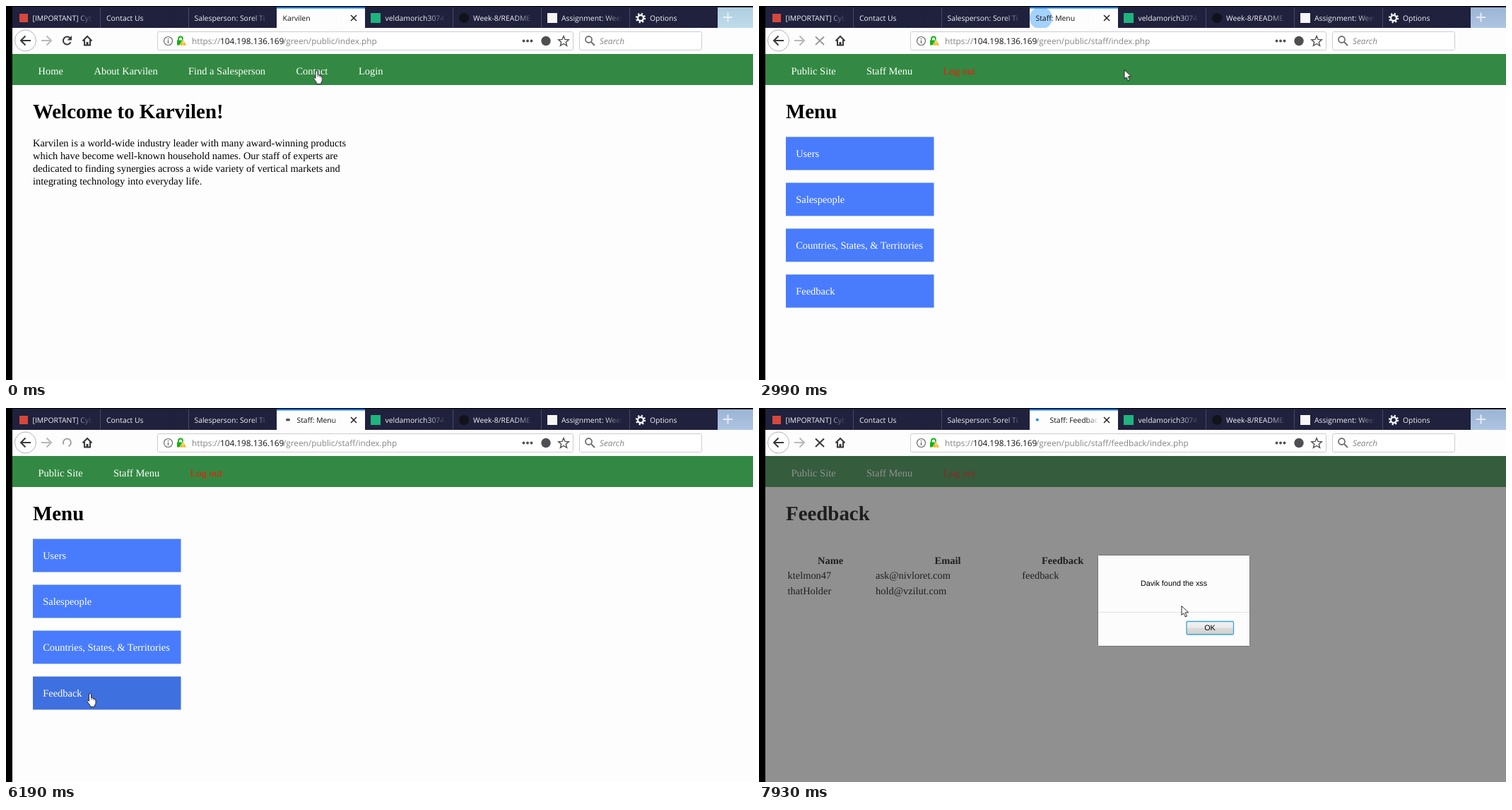
An HTML page for the animation above (8 s loop, 1057 px wide and 530 px high).

```html
<!DOCTYPE html>
<html lang="en">
<head>
<meta charset="utf-8">
<title>Browser session</title>
<style>
html, body { margin: 0; width: 100%; height: 100%; overflow: hidden; background: #fdfdfd; }
svg { display: block; }
text { white-space: pre; text-rendering: geometricPrecision; }

.tabs text { font: 10.4px "Open Sans", sans-serif; fill: #f4f4f6; }
.tabs .active text { fill: #111; }
.bar text { font: 11.8px "Open Sans", sans-serif; fill: #858588; }
.bar .host { fill: #111; }
.bar .hint { font-style: italic; }
.page text { font: 14.45px "Liberation Serif", serif; }
.page .h1 { font-size: 28.9px; font-weight: bold; }
.page .th { font-weight: bold; }
.page .light text, .page text.light { fill: #fff; }
.page text.out { fill: #ff1208; }
.dialog text { font: 10.8px "Liberation Sans", sans-serif; text-anchor: middle; }
.line { fill: none; stroke: #39393d; stroke-width: 2; }

/* Every change is a hard cut on one 8 s clock */
.home, .menu, .feedback, .title, .busy, .burst, .reload, .arc, .cross, .slash,
.hover, .cursor, .hand, .arrow, .corner { animation: 8s step-end infinite; }

.home { animation-name: home; }
.menu { animation-name: menu; }
.feedback { animation-name: feedback; }
.title { animation-name: title; }
.busy { animation-name: busy; }
.burst { animation-name: burst; }
.reload { animation-name: reload; }
.arc { animation-name: arc; }
.cross { animation-name: cross; }
.slash { animation-name: slash; }
.hover { animation-name: hover; }
.cursor { animation-name: move; }
.hand { animation-name: hand; }
.arrow { animation-name: arrow; }
.corner { animation-name: corner; }

@keyframes home { 0% { opacity: 1 } 35.875%, 100% { opacity: 0 } }
@keyframes menu { 0% { opacity: 0 } 35.875% { opacity: 1 } 79.25%, 100% { opacity: 0 } }
@keyframes feedback { 0% { opacity: 0 } 79.25%, 100% { opacity: 1 } }
@keyframes corner { 0% { opacity: 0 } 34.125%, 100% { opacity: 1 } }
@keyframes title {
  0% { transform: translateX(0) } 34.125% { transform: translateX(20px) }
  37.375% { transform: translateX(0) } 75.875%, 100% { transform: translateX(20px) }
}
@keyframes busy {
  0% { opacity: 0; fill: #555; rx: 2px; transform: translateX(403px) }
  34.125% { opacity: 1; fill: #555; rx: 2px; transform: translateX(402px) }
  35.875% { opacity: 1; fill: #0a84ff; rx: 3px; transform: translateX(398px) }
  37.375% { opacity: 0; fill: #555; rx: 2px; transform: translateX(403px) }
  75.875% { opacity: 1; fill: #555; rx: 2.2px; transform: translateX(403px) }
  77.375% { opacity: 1; fill: #555; rx: 3px; transform: translateX(399px) }
  79.25% { opacity: 1; fill: #0a84ff; rx: 2.2px; transform: translateX(403px) }
  80.875% { opacity: 1; fill: #0a84ff; rx: 2.5px; transform: translateX(402px) }
  82.625% { opacity: 1; fill: #0a84ff; rx: 3px; transform: translateX(398.7px) }
  84.25% { opacity: 1; fill: #0a84ff; rx: 2.5px; transform: translateX(395.4px) }
  85.75% { opacity: 1; fill: #0a84ff; rx: 2px; transform: translateX(393.8px) }
  87.25% { opacity: 1; fill: #0a84ff; rx: 2.2px; transform: translateX(394.6px) }
  89% { opacity: 1; fill: #0a84ff; rx: 3px; transform: translateX(397.9px) }
  90.5% { opacity: 1; fill: #0a84ff; rx: 2.5px; transform: translateX(401.1px) }
  92.375% { opacity: 1; fill: #0a84ff; rx: 2px; transform: translateX(403.2px) }
  94.25% { opacity: 1; fill: #0a84ff; rx: 2.5px; transform: translateX(401.7px) }
  95.75% { opacity: 1; fill: #0a84ff; rx: 3px; transform: translateX(398.7px) }
  97.25% { opacity: 1; fill: #0a84ff; rx: 2.5px; transform: translateX(395.6px) }
  99.125%, 100% { opacity: 1; fill: #0a84ff; rx: 2px; transform: translateX(393.8px) }
}
@keyframes burst {
  0% { opacity: 0; r: 16px } 37.375% { opacity: .36; r: 16px }
  39.375% { opacity: .1; r: 88px } 41.125%, 100% { opacity: 0; r: 88px }
}
@keyframes reload {
  0% { opacity: 1 } 35.875% { opacity: 0 } 44.25% { opacity: .5 } 45.75% { opacity: 1 }
  75.875% { opacity: .6 } 77.375%, 100% { opacity: 0 }
}
@keyframes arc {
  0% { opacity: 0 } 41.125% { opacity: .45 } 44.25% { opacity: 0 }
  77.375% { opacity: .45 } 79.25%, 100% { opacity: 0 }
}
@keyframes cross {
  0% { opacity: 0 } 35.875% { opacity: 1 } 37.375% { opacity: .5 }
  41.125% { opacity: 0 } 79.25%, 100% { opacity: 1 }
}
@keyframes slash {
  0% { stroke-dasharray: 20 20 } 79.25% { stroke-dasharray: 6 20 } 80.875%, 100% { stroke-dasharray: 20 20 }
}
@keyframes hover { 0% { fill: #497cfd } 55.75%, 100% { fill: #3f70e0 } }
@keyframes hand {
  0% { opacity: 1 } 35.875% { opacity: 0 } 55.75% { opacity: 1 } 79.25%, 100% { opacity: 0 }
}
@keyframes arrow {
  0% { opacity: 0 } 35.875% { opacity: 1 } 55.75% { opacity: 0 } 79.25%, 100% { opacity: 1 }
}
@keyframes move {
  0% { transform: translate(434.5px, 91px) }
  1.5% { transform: translate(426px, 92px) }
  3% { transform: translate(418px, 93px) }
  19.375% { transform: translate(419px, 90px) }
  21.25% { transform: translate(422px, 86px) }
  23.125% { transform: translate(431px, 86px) }
  24.625% { transform: translate(452px, 87px) }
  26.25% { transform: translate(477px, 89px) }
  27.75% { transform: translate(499px, 91px) }
  29.25% { transform: translate(510px, 91px) }
  31% { transform: translate(511.5px, 90px) }
  35.875% { transform: translate(516.5px, 90px) }
  41.125% { transform: translate(503px, 122px) }
  42.625% { transform: translate(446px, 215px) }
  44.25% { transform: translate(370px, 305px) }
  45.75% { transform: translate(324px, 334px) }
  47.5% { transform: translate(318px, 346px) }
  49.125% { transform: translate(311px, 359px) }
  50.875% { transform: translate(298px, 373px) }
  52.375% { transform: translate(287px, 382px) }
  54.25% { transform: translate(262px, 388px) }
  55.75% { transform: translate(206px, 397px) }
  57.25% { transform: translate(150px, 405px) }
  58.75% { transform: translate(119px, 406px) }
  60.625% { transform: translate(127px, 408px) }
  62.25% { transform: translate(135px, 408px) }
  64% { transform: translate(112px, 406px) }
  65.5% { transform: translate(100px, 404px) }
  67.125% { transform: translate(114px, 404px) }
  79.25% { transform: translate(118.5px, 403.5px) }
  82.625% { transform: translate(145px, 426px) }
  84.25% { transform: translate(290px, 470px) }
  85.75% { transform: translate(500px, 458px) }
  87.25% { transform: translate(655px, 391px) }
  89% { transform: translate(640px, 285px) }
  90.5% { transform: translate(608px, 210px) }
  92.375% { transform: translate(605px, 209px) }
  94.25% { transform: translate(601px, 232px) }
  95.75% { transform: translate(600px, 262px) }
  97.25% { transform: translate(598px, 277px) }
  99.125%, 100% { transform: translate(597.5px, 280px) }
}
</style>
</head>
<body>
<svg width="1057" height="530" viewBox="0 0 1057 530">
  <defs>
    <linearGradient id="fadeDark"><stop stop-color="#20213d" stop-opacity="0"/><stop offset="1" stop-color="#20213d"/></linearGradient>
    <linearGradient id="fadeLight"><stop stop-color="#fdfdfd" stop-opacity="0"/><stop offset="1" stop-color="#fdfdfd"/></linearGradient>
    <linearGradient id="sky" x2="0" y2="1"><stop stop-color="#aecfe1"/><stop offset="1" stop-color="#bfdbe8"/></linearGradient>
    <linearGradient id="dusk" x2="0" y2="1"><stop stop-color="#9db5d4"/><stop offset="1" stop-color="#adc5e2"/></linearGradient>
    <linearGradient id="button" x2="0" y2="1">
      <stop stop-color="#f3f3f3"/><stop offset=".48" stop-color="#e9e9e9"/>
      <stop offset=".5" stop-color="#dcdcdc"/><stop offset="1" stop-color="#cfcfcf"/>
    </linearGradient>
    <clipPath id="tab"><path d="M383 3h125v28H383z"/></clipPath>
    <g id="end">
      <path d="M-36 3h26v27h-26z" fill="url(#fadeDark)"/>
      <path d="M-10.500 3H0v27h-10.500z" fill="#20213d"/>
      <path d="M.5 2v29" stroke="#484963"/>
    </g>
  </defs>

  <rect width="1057" height="530" fill="#fdfdfd"/>

  <g class="page">
    <path d="M9 68h1048v44H9z" fill="#338943"/>

    <g class="home">
      <g class="light">
        <text x="45.6" y="97">Home</text>
        <text x="124.5" y="97">About Karvilen</text>
        <text x="258" y="97">Find a Salesperson</text>
        <text x="410.4" y="97">Contact</text>
        <text x="499" y="97">Login</text>
      </g>
      <text class="h1" x="38" y="159">Welcome to Karvilen!</text>
      <text x="38" y="199">Karvilen is a world-wide industry leader with many award-winning products</text>
      <text x="38" y="217">which have become well-known household names. Our staff of experts are</text>
      <text x="38" y="235">dedicated to finding synergies across a wide variety of vertical markets and</text>
      <text x="38" y="253">integrating technology into everyday life.</text>
    </g>

    <g class="menu">
      <text class="light" x="45.6" y="97">Public Site</text>
      <text class="light" x="152" y="97">Staff Menu</text>
      <text class="out" x="260.6" y="97">Log out</text>
      <text class="h1" x="38" y="159">Menu</text>
      <path d="M38 185.500h209.500v47H38zM38 250.500h209.500v47H38zM38 315.500h209.500v47H38z" fill="#497cfd"/>
      <path class="hover" d="M38 380.500h209.500v47H38z"/>
      <g class="light">
        <text x="52.2" y="214">Users</text>
        <text x="52.2" y="279">Salespeople</text>
        <text x="52.2" y="344">Countries, States, &amp; Territories</text>
        <text x="52.2" y="409">Feedback</text>
      </g>
    </g>

    <g class="feedback">
      <text class="light" x="45.6" y="97">Public Site</text>
      <text class="light" x="152" y="97">Staff Menu</text>
      <text class="out" x="260.6" y="97">Log out</text>
      <text class="h1" x="38" y="159">Feedback</text>
      <text class="th" x="83" y="220.5">Name</text>
      <text class="th" x="248.5" y="220.5">Email</text>
      <text class="th" x="400" y="220.5">Feedback</text>
      <text x="40.5" y="242">ktelmon47</text>
      <text x="165" y="242">ask@nivloret.com</text>
      <text x="372.3" y="242">feedback</text>
      <text x="40.5" y="263.5">thatHolder</text>
      <text x="165" y="263.5">hold@vzilut.com</text>
      <path d="M9 68h1048v462H9z" fill="#37373a" fill-opacity=".55"/>
    </g>
  </g>

  <g class="feedback dialog">
    <rect x="479.5" y="208.5" width="215" height="129" rx="1" fill="#fcfcfc" stroke="#747577"/>
    <path d="M480 289.500h214" stroke="#e4e4e4"/>
    <text x="587" y="252">Davik found the xss</text>
    <rect x="605" y="302.5" width="66.5" height="18.5" rx="1.5" fill="url(#button)" stroke="#3ba6cf" stroke-width="1.3"/>
    <text x="638" y="315.3">OK</text>
  </g>

  <g class="bar">
    <path d="M9 31h1048v37H9z" fill="#fdfdfd"/>
    <circle cx="27.5" cy="49" r="15" fill="#fff" stroke="#b4b4b7"/>
    <path class="line" d="M35 49H21m6.500-6.500L21 49l6.500 6.500"/>
    <path class="line" d="M50 49h14m-6.500-6.500L64 49l-6.500 6.500" stroke-opacity=".35"/>
    <g class="reload">
      <path class="line" d="M91 46a5.500 5.500 0 1 0 .5 5.200"/>
      <path d="M93 42v6.500h-6.500z" fill="#39393d"/>
    </g>
    <path class="arc line" d="M81.500 51.500a5.500 5.500 0 1 1 7 2.600"/>
    <g class="cross line">
      <path d="M80 43.500L92 55"/>
      <path class="slash" d="M80 55L92 43.500"/>
    </g>
    <path class="line" d="M108.500 49.500l6.500-6.500 6.500 6.500M111 48v7.500h8V48"/>
    <path d="M113.500 51h3v5h-3z" fill="#39393d"/>

    <rect x="214.5" y="36.5" width="588" height="26" rx="2" fill="#fff" stroke="#cdcdd0"/>
    <circle cx="229.5" cy="49.5" r="6" fill="none" stroke="#6b6b6f" stroke-width="1.2"/>
    <path d="M229.500 48.500v4.500M229.500 45.700v1.600" stroke="#6b6b6f" stroke-width="1.4"/>
    <path d="M244 49v-2.500a3 3 0 0 1 6 0V49" fill="none" stroke="#12b312" stroke-width="1.8"/>
    <path d="M242 48.500h9.500v7H242z" fill="#12b312"/>
    <path d="M250.500 47.500l5 8.500h-10z" fill="#f7b11b" stroke="#fff" stroke-width=".6"/>
    <path d="M250.500 50.200v2.600M250.500 53.700v1.200" stroke="#fff"/>
    <text x="263" y="54">https://</text>
    <text class="host" x="303" y="54">104.198.136.169</text>
    <text class="home" x="392" y="54">/green/public/index.php</text>
    <text class="menu" x="392" y="54">/green/public/staff/index.php</text>
    <text class="feedback" x="392" y="54">/green/public/staff/feedback/index.php</text>
    <g fill="#4f4f53">
      <circle cx="732.5" cy="49.5" r="1.9"/><circle cx="738" cy="49.5" r="1.9"/><circle cx="743.5" cy="49.5" r="1.9"/>
      <circle cx="764" cy="49.5" r="6.7"/>
    </g>
    <path d="M789 42.500l2 4.900 5.300.4-4 3.400 1.300 5.100-4.600-2.800-4.600 2.800 1.300-5.100-4-3.400 5.300-.4z" fill="none" stroke="#4f4f53" stroke-width="1.4"/>
    <rect x="811.5" y="36.5" width="173" height="26" rx="2" fill="#fff" stroke="#cdcdd0"/>
    <circle cx="824.5" cy="47.5" r="4.5" fill="none" stroke="#6f6f73" stroke-width="1.8"/>
    <path d="M828 51l5 5" stroke="#6f6f73" stroke-width="2"/>
    <text class="hint" x="840" y="54">Search</text>
  </g>

  <g class="tabs">
    <path d="M9 1h1048v30H9z" fill="#20213d"/>
    <path d="M1007 2h50v29h-50z" fill="url(#sky)"/>
    <path class="corner" d="M1007 2h50v29h-50z" fill="url(#dusk)"/>
    <path d="M1015 16h13M1021.500 9.500v13" stroke="#f4f8fb" stroke-opacity=".8" stroke-width="2"/>

    <rect x="19" y="11" width="12" height="12" fill="#d5483c"/>
    <text x="37.5" y="21">[IMPORTANT] Cyber</text>
    <text x="142" y="21">Contact Us</text>
    <text x="266.5" y="21">Salesperson: Sorel Ti</text>
    <rect x="516" y="10" width="14" height="14" fill="#1fb37e"/>
    <text x="536.5" y="21">veldamorich3074</text>
    <circle cx="648" cy="17" r="7" fill="#12121a"/>
    <text x="661" y="21">Week-8/README.</text>
    <rect x="766" y="10" width="14" height="14" fill="#f6f6f6"/>
    <text x="786" y="21">Assignment: Week</text>
    <g fill="none" stroke="#f4f4f6" stroke-width="2.4">
      <circle cx="898" cy="17" r="4"/>
      <circle cx="898" cy="17" r="6" stroke-dasharray="2.2 2.512"/>
    </g>
    <text x="911" y="21">Options</text>
    <use href="#end" x="133"/><use href="#end" x="258"/><use href="#end" x="383"/>
    <use href="#end" x="632"/><use href="#end" x="757"/><use href="#end" x="882"/>

    <g class="active" clip-path="url(#tab)">
      <path d="M383 3h125v28H383z" fill="#fdfdfd"/>
      <circle class="burst" cx="399" cy="17" r="16" fill="#0a84ff"/>
      <ellipse class="busy" cy="16.7" rx="2" ry="1.9"/>
      <g class="title">
        <text class="home" x="391.5" y="21">Karvilen</text>
        <text class="menu" x="391.5" y="21">Staff: Menu</text>
        <text class="feedback" x="391.5" y="21">Staff: Feedback</text>
      </g>
      <path d="M463 4h18v26h-18z" fill="url(#fadeLight)"/>
      <path d="M481 4h27v26h-27z" fill="#fdfdfd"/>
      <path d="M488 13l8 8m0-8l-8 8" stroke="#222" stroke-width="1.5"/>
    </g>
    <path d="M383 1.500h125v2H383z" fill="#0a84ff"/>
  </g>

  <path d="M0 0h1057v1H9v529H0z"/>

  <g class="cursor" fill="#fff" stroke="#26262b" stroke-linejoin="round">
    <path class="arrow" d="M.5.5V13.500L3.500 10.700 5.700 16 8 15 5.800 9.800H10.200z"/>
    <g class="hand">
      <path d="M3.500 2Q3.500.5 5 .5T6.500 2V6.500Q9 6 9 7.500 11 7 11 8.500 13 8 13 10V14Q13 16 11.500 17V19.500H5V17.500L1 12Q0 10 1.800 10L3.500 11.500z"/>
      <path d="M6.500 6.500v3M9 7.500v2.500M11 8.500v2" fill="none" stroke-width=".7"/>
    </g>
  </g>
</svg>
</body>
</html>
```
